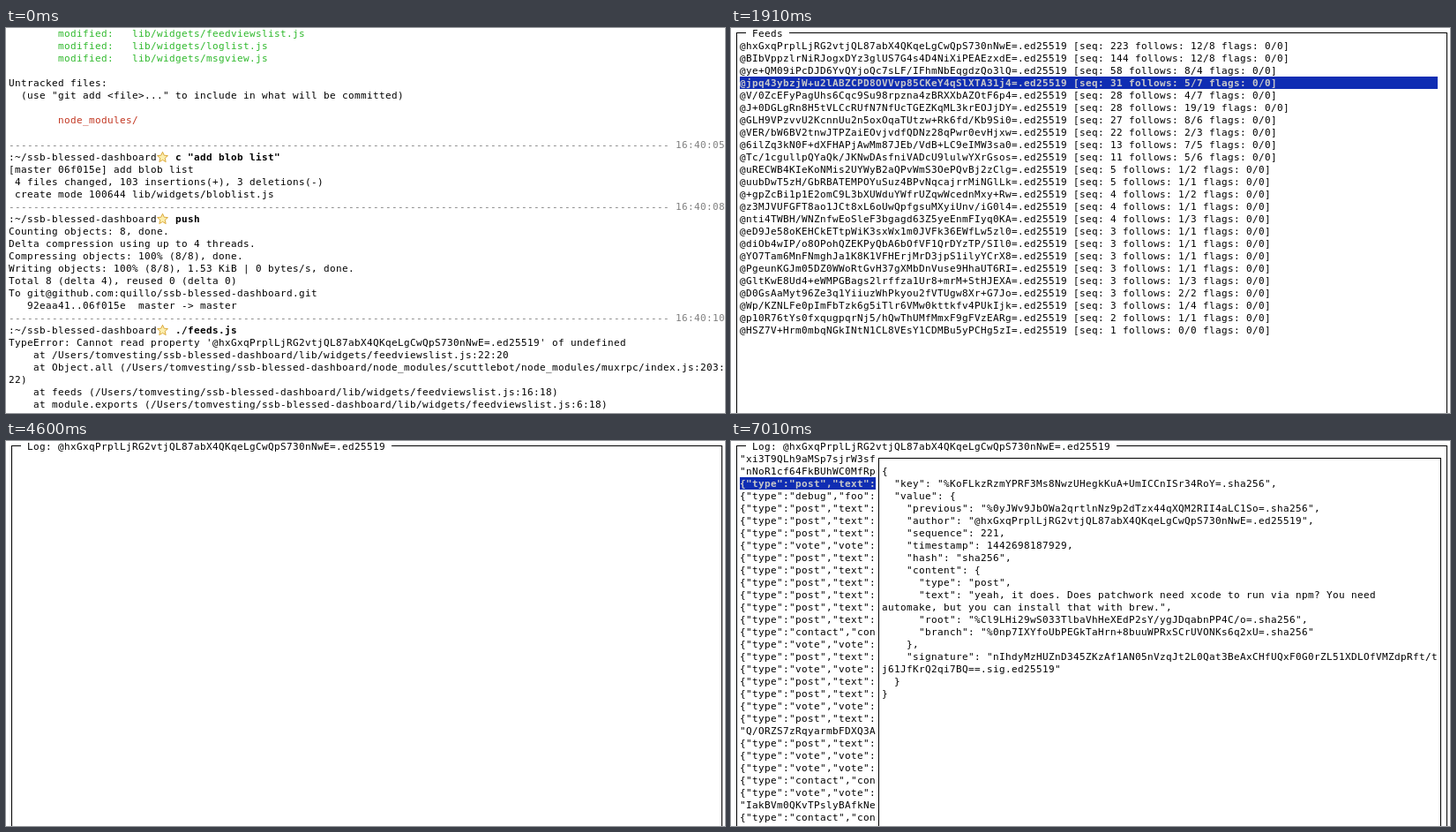
Write an HTML page that moves like this. It is 815 px wide and 436 px high and loops after 8000 ms.

```html
<!DOCTYPE html>
<html lang="en">
<head>
<meta charset="utf-8">
<title>Terminal dashboard</title>
<style>
html, body { margin: 0; width: 100%; height: 100%; overflow: hidden; background: #fff; }
#stage { position: relative; width: 815px; height: 436px; overflow: hidden; background: #fff; }
#stage > * { position: absolute; box-sizing: border-box; }
pre {
  margin: 0; padding-top: 1px; color: #000; white-space: pre;
  font: 11px/14px "DejaVu Sans Mono", monospace;
  letter-spacing: calc(7px - 1ch);
}
.bold { font-weight: 700; }
.green { color: #2fb92c; }
.red { color: #c23621; }
.gray { color: #808080; }
.title { background: #fff; }
.sel { width: 791px; height: 14px; overflow: hidden; background: #0f2db3; color: #c8c8c8; font-weight: 700; }
.box { border: 1px solid #000; background: #fff; }
.track { left: 801px; top: 13px; width: 7px; height: 423px; background: #4aa9b3; border-top: 14px solid #000; }
.cover { left: 164px; top: 13px; width: 644px; height: 423px; background: #fff; }
</style>
</head>
<body>
<div id="stage"></div>
<script>
const CELL = 7, ROW = 14, LOOP = 8000;
const stage = document.getElementById('stage');
const x = col => 3 + CELL * col;
const y = row => ROW * row - 1;
const esc = s => s.replace(/&/g, '&amp;').replace(/</g, '&lt;');

const put = (row, col, text, cls = '') =>
  `<pre class="${cls}" style="left:${x(col)}px;top:${y(row)}px">${esc(text)}</pre>`;
const box = (left, top, right) =>
  `<div class="box" style="left:${left}px;top:${top}px;width:${right - left}px;height:500px"></div>`;
const panel = title => box(6, 5, 812) + put(0, 2, ` ${title} `, 'title');
const list = (title, items, sel) => panel(title) +
  items.map((s, i) => put(i + 1, 1, s.slice(0, 113), i + 1 === sel ? 'sel' : '')).join('');

const star = row => `<svg style="left:171px;top:${y(row)}px" width="14" height="14">
  <path d="M6.5 1.3 8.2 5.2 12.4 5.6 9.2 8.4 10.2 12.6 6.5 10.4 2.8 12.6 3.8 8.4 .6 5.6 4.8 5.2Z"
  fill="#fcefaf" stroke="#dcaa3c"/></svg>`;

// Shell: "$" prompt, "-" ruler with the time, "+" green, "!" red, anything else plain
const home = '/Users/tomvesting/ssb-blessed-dashboard/';
const shellLines = `+        modified:   lib/widgets/feedviewslist.js
+        modified:   lib/widgets/loglist.js
+        modified:   lib/widgets/msgview.js

 Untracked files:
   (use "git add <file>..." to include in what will be committed)

!        node_modules/

-16:40:05
$c "add blob list"
 [master 06f015e] add blob list
  4 files changed, 103 insertions(+), 3 deletions(-)
  create mode 100644 lib/widgets/bloblist.js
-16:40:08
$push
 Counting objects: 8, done.
 Delta compression using up to 4 threads.
 Compressing objects: 100% (8/8), done.
 Writing objects: 100% (8/8), 1.53 KiB | 0 bytes/s, done.
 Total 8 (delta 4), reused 0 (delta 0)
 To git@github.com:quillo/ssb-blessed-dashboard.git
    92eaa41..06f015e  master -> master
-16:40:10
$./feeds.js
 TypeError: Cannot read property '@hxGxqPrplLjRG2vtjQL87abX4QKqeLgCwQpS730nNwE=.ed25519' of undefined
     at ${home}lib/widgets/feedviewslist.js:22:20
     at Object.all (${home}node_modules/scuttlebot/node_modules/muxrpc/index.js:203:
 22)
     at feeds (${home}lib/widgets/feedviewslist.js:16:18)
     at module.exports (${home}lib/widgets/feedviewslist.js:6:18)
     at Object.<anonymous> (${home}lib/widgets/feedviewslist.js:21:3)`.split('\n');

const shell = () => shellLines.map((line, row) => {
  const kind = line[0], text = line.slice(1);
  if (kind === '$') return put(row, 0, ':~/ssb-blessed-dashboard') + star(row) + put(row, 27, text, 'bold');
  if (kind === '-') return put(row, 0, '-'.repeat(107) + ' ' + text, 'gray');
  return put(row, 0, text, { '+': 'green', '!': 'red' }[kind]);
}).join('');

// Feeds: key, sequence, follows
const feeds = `hxGxqPrplLjRG2vtjQL87abX4QKqeLgCwQpS730nNwE 223 12/8
BIbVppzlrNiRJogxDYz3glUS7G4s4D4NiXiPEAEzxdE 144 12/8
ye+QM09iPcDJD6YvQYjoQc7sLF/IFhmNbEqgdzQo3lQ 58 8/4
jpq43ybzjW+u2lABZCPD8OVVvp85CKeY4qSlXTA31j4 31 5/7
V/0ZcEFyPagUhs6Cqc9Su98rpzna4zBRXXbAZOtF6p4 28 4/7
J+0DGLgRn8H5tVLCcRUfN7NfUcTGEZKqML3krEOJjDY 28 19/19
GLH9VPzvvU2KcnnUu2n5oxOqaTUtzw+Rk6fd/Kb9Si0 27 8/6
VER/bW6BV2tnwJTPZaiEOvjvdfQDNz28qPwr0evHjxw 22 2/3
6ilZq3kN0F+dXFHAPjAwMm87JEb/VdB+LC9eIMW3sa0 13 7/5
Tc/1cgullpQYaQk/JKNwDAsfniVADcU9lulwYXrGsos 11 5/6
uRECWB4KIeKoNMis2UYWyB2aQPvWmS3OePQvBj2zClg 5 1/2
uubDwT5zH/GbRBATEMPOYuSuz4BPvNqcajrrMiNGlLk 5 1/1
+gpZcBi1p1E2omC9L3bXUWduYWfrUZqwWcednMxy+Rw 4 1/2
z3MJVUFGFT8ao1JCt8xL6oUwQpfgsuMXyiUnv/iG0l4 4 1/1
nti4TWBH/WNZnfwEoSleF3bgagd63Z5yeEnmFIyq0KA 4 1/3
eD9Je58oKEHCkETtpWiK3sxWx1m0JVFk36EWfLw5zl0 3 1/1
diOb4wIP/o8OPohQZEKPyQbA6bOfVF1QrDYzTP/SIl0 3 1/1
YO7Tam6MnFNmghJa1K8K1VFHErjMrD3jpS1ilyYCrX8 3 1/1
PgeunKGJm05DZ0WWoRtGvH37gXMbDnVuse9HhaUT6RI 3 1/1
GltKwE8Ud4+eWMPGBags2lrffza1Ur8+mrM+StHJEXA 3 1/3
D0GsAaMyt96Ze3q1YiiuzWhPkyou2fVTUgw8Xr+G7Jo 3 2/2
Wp/KZNLFe0pImFbTzk6g5iTlr6VMw0kttkfv4PUkIjk 3 1/4
p10R76tYs0fxqugpqrNj5/hQwThUMfMmxF9gFVzEARg 2 1/1
HSZ7V+Hrm0mbqNGkINtN1CL8VEsY1CDMBu5yPCHg5zI 1 0/0`.split('\n').map(s => s.split(' '));
const id = i => `@${feeds[i][0]}=.ed25519`;
const feedItems = feeds.map(([, seq, follows], i) =>
  `${id(i)} [seq: ${seq} follows: ${follows} flags: 0/0]`);
const feedList = sel => () => list('Feeds', feedItems, sel);

const menu = () => list('Feed: ' + id(0), ['Log', 'Followeds', 'Followers', 'Flaggeds', 'Flaggers', 'Blobs'], 1);

// Log: "p" post, "v" vote, "c" contact (feed index), "=" as is
const fence = '`'.repeat(3);
const logItems = String.raw`="xi3T9QLh9aMSp7sjrW3sfD1LFO9Zu8GPRrRs46n/Paj4arg9kQF+rf+SXHNI+dhtxoGNXec7kReWg1C0ZBaKDPhhXw97LS7DGaeSPjDgQqMKDfbC
="nNoR1cf64FkBUhWC0MfRpuJovOn0ymrl14/JYes0yv0zpCSTTe4CwjWBxhAHuUQQnSgw+hm5EEwjiMyT32HTCxtzucLpvysD/StCahEx2AgqpJLg
pyeah, it does. Does patchwork need xcode to run via npm? You need automake, but you can
={"type":"debug","foo":true,"bar":false}
pWe intend to mainstream all three. Patchwork's waiting for Scuttlebot. Once Scuttlebot's
pPatchwork is getting demoted to \"just an app\" status. It won't embed sbot - it's going
pMeta priorities:\n1. Launch sbot\n2. Launch patchwork\n3. Launch brickhouse\n\nSbot
vWbQ4dq0m/zu5jxll9zUbe0iGmDOajCx1ZkLKjZ80JvI
pOh yeah, that'd be super easy to make!","root":"%TebCZQ1YrkbYBfwkQGTr836VervdPIbOLevgXVH0U
pThanks, fixed","root":"%+CVsEiU4vzqyLzSQEZnl3dyr+14yYtwtpY/o4OMtVgQ=.sha256","branch":"%+C
pnice, where is that?","root":"%WHO8mZoRqAnYGNxCdkgittFD38DqW0iSr7xxS9fi4tg=.sha256","branc
pYeah that's pretty close. Here's a grammar:\n\n${fence}\ninvite := shs-address '~' token\nshs-a
pHmm, yeah the perms thing was wishful thinking. I'll look into that.","root":"%+hSdTLOoUpB
pAh, yeah, looks like the invite-code is getting messed up there. Probably would be smart
c10
v+hSdTLOoUpBMqHUMF8LuXg/T0W+aPsyesZtUelk8VfU
pSolid guide, we should put it in ssb-docs.\n\n> NOTE npm install -g scuttlebot fails
vgcF5SfZafeDa8aFydRLL3pSiOmZVpWuGy+7Ly4hhNY8
pI feel that, I was out in the boonies of Texas and appreciated SSB for the same reason.","
p@bolbol yeah we got involved in the https://github.com/qldr/brickhouse project to try to
vvPKVLXxVtITzGd37U+wPTBaOeeS1/RKqP2051fqx2U8
pOh, actually yeah I like that. Your PR has opacity set at 0, though - is that right?","roo
="Q/ORZS7zRqyarmbFDXQ3AaPBYjYoJJLYp+zf/uCGM8ESWd7CXpmtFAznACgZvBPlc2qAhCyJzXBaqo6dCx+5fXLKK6moF7xNeIyyv/USBqH9j76G
pHuh, yeah we gotta sort that out. I appreciate you doing that research! :boom:","root":"%+
v+tLYIXlT6tzJeOZmU731DQXpUXLvDsTqLzC7au9sLgY
v25TUT2HkfVqNYeAOaqKYJ05QVPdpBKpFqrp+Gtb4VM4
c2
vgJxVOdnrlEDAUE4b+MVrZihQbgiJYJJfWjOAOZsWXsg
="IakBVm0QKvTPslyBAfkNemek+yBt2vpA459Ruq0PcPfFYwgPBdNe9RfQzxi7mC7Kl19cprTcMC2UzBtNGA8Oue0nXBLJx8kpMKI4Xh+htuoJ5gt1
c14
c11`.split('\n').map(line => {
  const s = line.slice(1);
  switch (line[0]) {
    case 'p': return `{"type":"post","text":"${s}`;
    case 'v': return `{"type":"vote","vote":{"link":"%${s}=.sha256","value":1}}`;
    case 'c': return `{"type":"contact","contact":"${id(s)}","following":true,"blocking":false}`;
    default: return s;
  }
});
const logTitle = 'Log: ' + id(0);
const log = sel => () => list(logTitle, logItems, sel) + '<div class="track"></div>';

const message = `{
  "key": "%KoFLkzRzmYPRF3Ms8NwzUHegkKuA+UmICCnISr34RoY=.sha256",
  "value": {
    "previous": "%0yJWv9JbOWa2qrtlnNz9p2dTzx44qXQM2RII4aLC1So=.sha256",
    "author": "${id(0)}",
    "sequence": 221,
    "timestamp": 1442698187929,
    "hash": "sha256",
    "content": {
      "type": "post",
      "text": "yeah, it does. Does patchwork need xcode to run via npm? You need
automake, but you can install that with brew.",
      "root": "%Cl9LHi29wS033TlbaVhHeXEdP2sY/ygJDqabnPP4C/o=.sha256",
      "branch": "%0np7IXYfoUbPEGkTaHrn+8buuWPRxSCrUVONKs6q2xU=.sha256"
    },
    "signature": "nIhdyMzHUZnD345ZKzAf1AN05nVzqJt2L0Qat3BeAxCHfUQxF0G0rZL51XDLOfVMZdpRft/t
j61JfKrQ2qi7BQ==.sig.ed25519"
  }
}`;
const popup = () => log(3)() + '<div class="cover"></div>' + box(167, 19, 805) + put(2, 24, message);

const scenes = [
  [0, shell],
  [540, () => ''],
  [690, () => panel('Feeds')],
  [780, feedList(1)],
  [1530, feedList(2)],
  [1670, feedList(3)],
  [1910, feedList(4)],
  [2150, feedList(3)],
  [2330, feedList(2)],
  [2740, feedList(1)],
  [3340, menu],
  [4600, () => panel(logTitle)],
  [4830, log(1)],
  [6330, log(2)],
  [6770, log(3)],
  [7010, popup],
];

let shown;
function tick() {
  const t = performance.now() % LOOP;
  const scene = scenes.findLast(([start]) => start <= t);
  if (scene !== shown) {
    shown = scene;
    stage.innerHTML = scene[1]();
  }
  requestAnimationFrame(tick);
}
tick();
</script>
</body>
</html>
```
